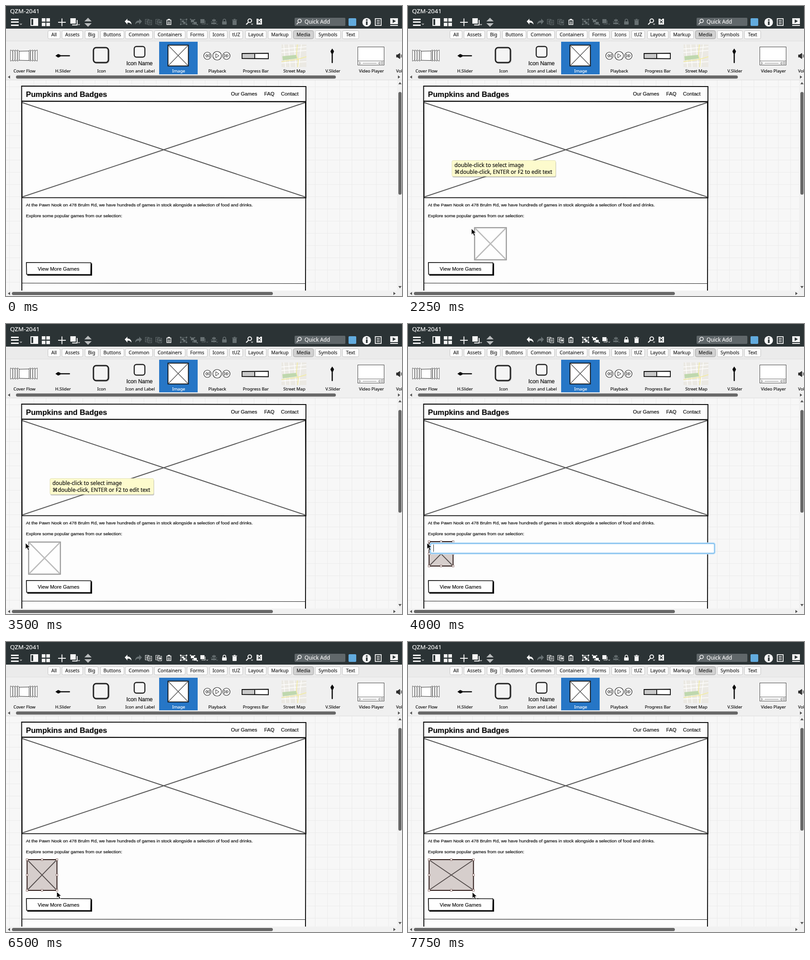
These frames come from a looping animation (874 by 641 pixels, 8000 ms). An HTML page:

```html
<!DOCTYPE html>
<html lang="en">
<head>
<meta charset="utf-8">
<title>Wireframe editor</title>
<style>
html, body { margin: 0; width: 100%; height: 100%; overflow: hidden; background: #f7f7f7; }
svg { display: block; width: 874px; height: 641px; }
text { white-space: pre; stroke-width: .2; }
.ui { font-family: "Noto Sans", "Open Sans", "DejaVu Sans", sans-serif; }
.page { font-family: "Liberation Sans", Arial, sans-serif; }
</style>
</head>
<body>
<svg id="stage" viewBox="0 0 874 641" xmlns="http://www.w3.org/2000/svg"></svg>
<script>
const rect = (x, y, w, h, fill, more = '') =>
  `<rect x="${x}" y="${y}" width="${w}" height="${h}" fill="${fill}" ${more}/>`;
const path = (d, stroke = 'none', width = 1, fill = 'none', more = '') =>
  `<path d="${d}" stroke="${stroke}" stroke-width="${width}" fill="${fill}" ${more}/>`;
const text = (s, x, y, size, fill = '#111', cls = 'ui', more = '') =>
  `<text class="${cls}" x="${x}" y="${y}" font-size="${size}" fill="${fill}" stroke="${fill}" ${more}>${s}</text>`;
const mid = 'text-anchor="middle"';
const group = (s, more = '') => `<g ${more}>${s}</g>`;

const INK = '#0c0c0c', BAR = '#2b3335', WHITE = '#f6f6f6', DIM = '#677072';

function cross(x, y, w, h) {
  return `M${x} ${y}l${w} ${h}M${x} ${y + h}l${w} ${-h}`;
}

// Icons that wake up once something is selected; drawn in currentColor.
function editIcons() {
  const c = 'currentColor';
  const sheet = (x, y) => rect(x, y, 8, 10, BAR, `stroke="${c}"`) +
    path(`M${x + 2} ${y + 3}h4m-4 2h4m-4 2h4`, c, 1);
  return sheet(307.5, 29.5) + sheet(313.5, 31.5) +
    sheet(330.5, 29.5) + sheet(335.5, 31.5) + path('M337 36h5m-2-2l2 2l-2 2', c, 1.4) +
    rect(386, 30, 12, 10, 'none', `stroke="${c}"`) +
    rect(388, 32, 5, 4, c) + rect(391, 35, 5, 4, c) +
    [[384, 28], [397, 28], [384, 39], [397, 39]].map(p => rect(...p, 3, 3, c)).join('') +
    rect(408, 30, 7, 6, c) + rect(414, 35, 7, 6, c) +
    [[406, 28], [415, 29], [411, 38], [421, 40]].map(p => rect(...p, 2.5, 2.5, c)).join('') +
    rect(429, 29, 9, 9, c) + path('M439.5 32v8h-8', c, 1.2) + path('M442 39l2 2l2-2', c, 1) +
    rect(477, 34, 10, 7, c, 'rx="1"') + path('M479 34v-2a3 3 0 0 1 6 0v2', c, 1.6) +
    rect(500, 32, 9, 10, c, 'rx="1"') + rect(499, 30, 11, 1.5, c) + rect(502.5, 28.5, 4, 1.5, c);
}

function toolbar() {
  const chevron = (x, y) => path(`M${x} ${y}l2 2l2-2`, '#ddd', 1.1);
  const undo = 'M262 34l6-6v4c6 0 9 4 9 9c-2-3-5-5-9-4v4z';
  return rect(0, 0, 874, 50, BAR) +
    text('QZM-2041', 9, 15.5, 13.4, WHITE) +
    [28, 34, 41].map(y => rect(11, y, 17, 3, WHITE)).join('') + chevron(31, 39) +
    rect(55, 28, 15, 15, 'none', `stroke="${WHITE}" stroke-width="2"`) + rect(60, 28, 11, 15, WHITE) +
    [79, 89].map(x => [27, 37].map(y => rect(x, y, 8, 7.5, WHITE)).join('')).join('') +
    path('M115 36h17M123.5 27.5v17', WHITE, 2) +
    rect(142, 27, 12, 12, WHITE) + path('M157 31v11h-11', WHITE, 2) + chevron(159, 40) +
    path('M173 34l8-8l8 8zM173 38h16l-8 8z', 'none', 0, '#b9bcbd') +
    path(undo, 'none', 0, WHITE) + path(undo, 'none', 0, DIM, 'transform="translate(562 0) scale(-1 1)"') +
    rect(355, 31, 9, 10, BAR, `stroke="${WHITE}" stroke-width="1.5"`) + rect(357, 28.5, 5, 3, WHITE) +
    path('M357 35h5m-5 2h5m-5 2h5', WHITE, 1) +
    group(editIcons(), 'id="edit"') +
    path('M452 35h14M459 28v13', DIM, 1.2) + rect(455, 30, 8, 3, DIM) + rect(453, 37, 11, 3, DIM) +
    path('M464 39l2 2l2-2', DIM, 1) +
    '<circle cx="538" cy="32.5" r="4" fill="none" stroke="#f6f6f6" stroke-width="2"/>' +
    path('M535 36l-5 5', WHITE, 2.4) + chevron(541, 39) +
    rect(553, 28, 12, 13, WHITE) + path('M556 32l6 6m0-6l-6 6', BAR, 1.5) + rect(557, 28, 4, 2, BAR) +
    rect(637, 26, 112, 18, '#60676a', 'rx="2"') +
    '<circle cx="648" cy="33" r="3.8" fill="none" stroke="#f6f6f6" stroke-width="1.6"/>' +
    path('M645.5 36l-4 4.5', WHITE, 1.8) +
    text('Quick Add', 659, 38.8, 11.7, WHITE) +
    rect(756, 27, 17, 17, '#62abde', 'rx="2"') +
    '<circle cx="796" cy="36" r="9.5" fill="#f6f6f6"/>' +
    rect(794.5, 34, 3.5, 8, BAR) + rect(794.5, 29.5, 3.5, 3, BAR) +
    rect(815, 28, 13, 15, 'none', `stroke="${WHITE}" stroke-width="1.8"`) +
    path('M818 32h7m-7 3.5h7m-7 3.5h7', WHITE, 1.4) +
    rect(848, 27, 17, 13, WHITE) + path('M853.5 29.5l7 4l-7 4z', 'none', 0, BAR) + rect(848, 42, 17, 2, WHITE);
}

function tabs() {
  const list = [['All', 92, 120], ['Assets', 123, 170], ['Big', 174, 204], ['Buttons', 208, 261],
    ['Common', 263, 324], ['Containers', 327, 396], ['Forms', 399, 445], ['Icons', 449, 489],
    ['tUZ', 493, 523], ['Layout', 528, 575], ['Markup', 578, 631], ['Media', 634, 679],
    ['Symbols', 682, 739], ['Text', 742, 779]];
  return list.map(([name, a, b]) => {
    const on = name === 'Media';
    return rect(a + .5, 54.5, b - a - 1, 18, on ? '#d2d2d2' : '#fcfcfc',
      `rx="3" stroke="${on ? '#9c9c9c' : '#c2c2c2'}"`) + text(name, (a + b) / 2, 67, 10.5, '#222', 'ui', mid);
  }).join('');
}

function coverFlow() {
  const panel = (x, s) => `M${x} 97l${5 * s} 3v19l${-5 * s} 3z`;
  return path([10, 15, 20, 25].map(x => panel(x, 1)).join('') +
    [69, 64, 59, 54].map(x => panel(x, -1)).join(''), '#444', .9, '#fff') +
    path('M29 100l22-.5v21l-22-.5z', '#333', 1, '#fff');
}

function streetMap() {
  return rect(608, 85, 55, 50, '#ebe9e3') +
    path('M613 85l4 50M624 85l3 50M636 85l4 50M652 85l-6 50M608 95l55-5M608 103l55-5M608 126l55-3', '#fff', 1.3) +
    path('M610 111l31-3l1 8l-31 4z', 'none', 0, '#bfd8ae') +
    path('M608 123l35-5l20-6M643 85l-2 24l4 11l-1 15', '#f3ec9c', 1.5);
}

function playback() {
  const ring = (x, r) => `<circle cx="${x}" cy="110" r="${r}" fill="#fff" stroke="#222" stroke-width="1.2"/>`;
  return ring(444.5, 8) + ring(466, 9.5) + ring(486.5, 8) +
    path('M444 106.5l-4 3.5l4 3.5zM449 106.5l-4 3.5l4 3.5z' +
      'M463 105.5l7 4.5l-7 4.5zM482 106.5l4 3.5l-4 3.5zM487 106.5l4 3.5l-4 3.5z', '#222', 1);
}

function palette() {
  const names = ['Cover Flow', 'H.Slider', 'Icon', 'Icon and Label', 'Image', 'Playback',
    'Progress Bar', 'Street Map', 'V.Slider', 'Video Player', 'Volume Slider'];
  const slider = path('M112 110h28', INK, 2.6, 'none', 'stroke-linecap="round"') +
    path('M109 110l6-4l5 2v4l-5 2z', 'none', 0, INK);
  return rect(338, 79, 85, 72, '#2676c6') +
    names.map((s, i) => text(s, 40.7 + 85.1 * i, 147, 9.5, i === 4 ? '#fff' : '#111', 'ui', mid)).join('') +
    coverFlow() + slider +
    rect(194, 93, 33, 33, 'none', 'rx="6" stroke="#bbb" stroke-width="3"') +
    rect(193, 92, 33, 33, '#f4f4f4', 'rx="6" stroke="#222" stroke-width="3"') +
    rect(283, 89.5, 23.5, 23.5, '#f6f6f6', 'rx="5" stroke="#222" stroke-width="2.4"') +
    text('Icon Name', 294.7, 131, 12, INK, 'page', mid) +
    rect(357.5, 86.5, 45, 46, '#fff', `stroke="${INK}" stroke-width="1.8"`) +
    path(cross(359, 88, 42, 43), '#555', 1.4) +
    playback() +
    rect(521, 104.5, 58, 11.5, '#fff') + rect(521, 104.5, 28, 11.5, '#c9c9c9') +
    path('M521 105l58-.5v12l-58-.5zM549 105v11', INK, 1.8) +
    streetMap() +
    group(slider, 'transform="translate(830 -15) rotate(90)"') +
    rect(776.5, 90.5, 58, 40, '#fff', 'stroke="#444"') + path('M777 121.5h57', '#666', 1) +
    path('M780 124v5l3-2.5zM787 126.5h31M822 126l3-2v5l-3-2zM828 124h4v4h-4z', '#666', .9) +
    path('M862 108h3l4-3v11l-4-3h-3z', '#111', 1.2, '#333') + path('M871.5 107q2 3 0 7', '#111', 1.2);
}

function grid() {
  let d = '';
  for (let x = 7.5; x < 863; x += 27) d += `M${x} 164v465`;
  for (let y = 178.5; y < 629; y += 27) d += `M0 ${y}h863`;
  return rect(0, 164, 874, 477, '#f7f7f7') + path(d, '#ebebeb', 1);
}

function page() {
  const P = (s, x, y, size, more) => text(s, x, y, size, INK, 'page', more);
  return rect(35, 178, 626, 452, '#fdfdfd') +
    path('M35 630L34.5 177L662 178L661 630', INK, 2) +
    path('M34 210.5L662 211.5', INK, 2.4) +
    path('M35 211L35.5 423.5L662 424L661 212', INK, 2) +
    path('M36 213.5L660 422M36 422L660 213.5', '#585858', 2) +
    path('M35 612.5L661 613.5', '#222', 1.1) +
    P('Pumpkins and Badges', 44, 200.5, 16.7, 'font-weight="bold"') +
    P('Our Games', 496.5, 198, 11.2) + P('FAQ', 570, 198, 11.2) + P('Contact', 607, 198, 11.2) +
    P('At the Pawn Nook on 478 Brulm Rd, we have hundreds of games in stock alongside a selection of food and drinks.', 44, 443, 9.9) +
    P('Explore some popular games from our selection:', 44, 467, 9.9) +
    path('M47 594.5H188.5V569', INK, 3) +
    path('M45 567L187.5 567.5L187 593.5L45.5 593z', INK, 1.7, '#fff') +
    P('View More Games', 70, 584.5, 11.2);
}

function scrollbars() {
  const thumb = (x, y, w, h) => rect(x, y, w, h, '#676767', 'rx="3.5"');
  return rect(863, 164, 11, 477, '#f1f1f1') + rect(0, 629, 874, 12, '#f1f1f1') +
    thumb(866, 190, 7, 227) + thumb(13, 632, 576, 7) + thumb(22, 153.5, 706, 7) +
    path('M9 153.5v7l-5-3.5zM865 153.5v7l5-3.5zM9 632v7l-5-3.5zM855 632v7l5-3.5z' +
      'M866 173h7l-3.5-5zM866 619h7l-3.5 5z', 'none', 0, '#555');
}

function overlays() {
  const tip = rect(98, 344, 229, 35, '#000', 'rx="3" opacity=".22"') +
    rect(97, 341.5, 229, 35, '#fdfbcd', 'rx="3" stroke="#dedcae" stroke-width=".8"') +
    text('double-click to select image', 102.5, 356, 11.8) +
    text('⌘double-click, ENTER or F2 to edit text', 102.5, 370.5, 11.9);
  const editor = rect(49, 484.5, 628, 23, '#fff', 'rx="3" stroke="#b9dcf6" stroke-width="3.5"') +
    rect(50, 485.5, 626, 21, '#fff', 'rx="2" stroke="#68b2ea" stroke-width="1.3"') +
    rect(56, 487.5, 1, 16, '#222', 'id="caret"');
  const ghost = rect(1, 1, 70, 71, '#fff', 'fill-opacity=".55" stroke="#8f8f8f" stroke-opacity=".9" stroke-width="2.4"') +
    path(cross(3, 3, 66, 67), '#a0a0a0', 2.6, 'none', 'opacity=".7"');
  const arrow = path('M0 0v13.5l3.2-3l2.6 6l2.6-1.1l-2.6-5.8h4.4z', '#fff', 1, '#000');
  return group(tip, 'id="tip"') + '<g id="box"></g>' + group(editor, 'id="editor"') +
    group(ghost, 'id="ghost"') + group(arrow, 'id="cursor"');
}

function selection(w, h) {
  const x = 46.5, y = 481;
  let s = rect(x, y, w, h, '#d6cecc', 'stroke="#281412" stroke-width="2"') +
    path(cross(x + 2, y + 2, w - 4, h - 4), '#514a49', 1.8);
  for (const i of [0, .5, 1]) for (const j of [0, .5, 1]) {
    if (i !== .5 || j !== .5)
      s += rect(x + i * w - 2, y + j * h - 2, 4, 4, '#fff', 'stroke="#85645f" stroke-width=".9"');
  }
  return s;
}

document.getElementById('stage').innerHTML = grid() + page() +
  rect(0, 50, 874, 114, '#f0f0f0') + rect(0, 50, 874, 28, '#ebebeb') + rect(0, 77, 874, 1, '#dedede') +
  rect(0, 163, 874, 1, '#dcdcdc') + scrollbars() + tabs() + palette() + toolbar() + overlays();

// One pose per 250 ms: cursor x, y and, while resizing, box width, height.
const STEP = 250;
const poses = [
  null, [384, 105], [382, 107], [380, 110], [375, 118], [368, 147],
  [329, 287], [276, 446], [250, 489], [140, 492], [59, 491],
  [51, 486], [47, 485], [44, 484], [43, 484], [42, 484],
  [42, 484], [43, 490], [55, 514], [82, 542], [97, 552], [97, 552],
  [97, 551], [98, 545], [99, 537], [104, 543, 58, 59], [112, 552, 66, 68],
  [119, 552, 73, 68], [126, 552, 80, 68], [132, 552, 86, 68], [138, 553, 93, 68], [142, 553, 98, 68]
];
const el = id => document.getElementById(id);
const show = (id, on) => el(id).setAttribute('visibility', on ? 'inherit' : 'hidden');
const move = (id, x, y) => el(id).setAttribute('transform', `translate(${x} ${y})`);
let last = -1;

function draw(now) {
  const n = Math.floor(now % 8000 / STEP);
  if (n === last) return;
  last = n;
  const [x, y, w = 53, h = 54] = poses[n] || [0, 0];
  const dropped = n >= 16;
  show('cursor', poses[n]);
  move('cursor', x, y);
  show('ghost', n >= 5 && !dropped);
  move('ghost', x + 6, y - 3);
  show('tip', n >= 9 && !dropped);
  show('editor', dropped && n < 22);
  show('caret', n !== 18 && n !== 19);
  el('box').innerHTML = dropped ? selection(w, h) : '';
  el('edit').setAttribute('color', dropped ? WHITE : DIM);
}

const start = performance.now();
function tick() {
  draw(performance.now() - start);
  requestAnimationFrame(tick);
}
tick();
</script>
</body>
</html>
```
